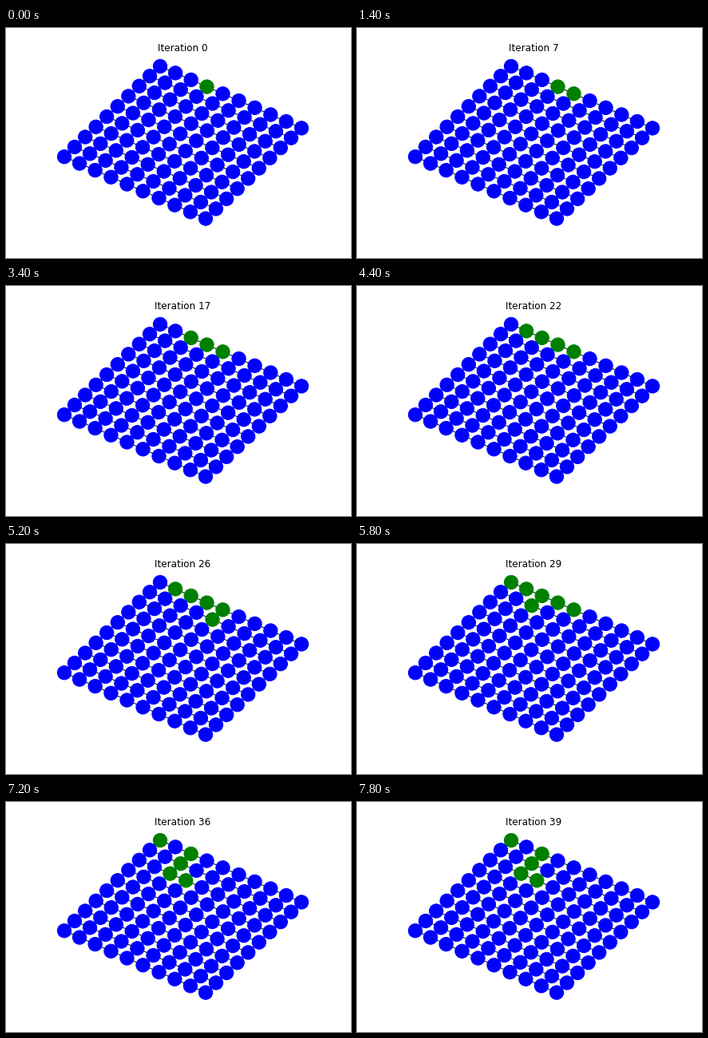
Write a matplotlib script that moves like this. It is 432 px wide and 288 px high and loops after 8000 ms.

```python
import numpy as np
import matplotlib.pyplot as plt
from matplotlib.animation import FuncAnimation
from matplotlib.collections import LineCollection

W, H, DPI = 432, 288, 72
SIDE = 10
FRAMES, STEP_MS = 40, 200

# (column, row, first iteration, end iteration) of each active spell
SPELLS = [
    (3, 0, 0, 10), (3, 0, 15, 35),
    (4, 0, 4, 34),
    (2, 0, 16, FRAMES),
    (1, 0, 21, 36),
    (4, 1, 23, 29),
    (2, 1, 28, FRAMES),
    (0, 0, 29, FRAMES),
    (2, 2, 30, FRAMES),
    (3, 2, 36, FRAMES),
]


def lattice():
    """Relaxed square lattice: steps shrink slightly towards the rim."""
    t = np.linspace(-1, 1, SIDE)
    s = t * (1 + 0.02 * (1 - t ** 2))
    col, row = np.meshgrid(s, s)
    x = 221.5 + 88.5 * col - 60.0 * row
    y = 143.3 + 38.7 * col + 56.6 * row
    return np.stack([x, y], axis=-1)


def links(pos):
    across = np.stack([pos[:, :-1], pos[:, 1:]], axis=2).reshape(-1, 2, 2)
    down = np.stack([pos[:-1], pos[1:]], axis=2).reshape(-1, 2, 2)
    return np.concatenate([across, down])


def node_colors(n):
    colors = ["blue"] * SIDE ** 2
    for col, row, start, end in SPELLS:
        if start <= n < end:
            colors[row * SIDE + col] = "green"
    return colors


fig, ax = plt.subplots(figsize=(W / DPI, H / DPI), dpi=DPI)
fig.subplots_adjust(left=0.125, right=0.9, bottom=0.11, top=0.88)
ax.set_xlim(0.125 * W, 0.9 * W)
ax.set_ylim(0.89 * H, 0.12 * H)
ax.axis("off")

pos = lattice()
ax.add_collection(LineCollection(links(pos), colors="black", linewidths=1, zorder=1))
nodes = ax.scatter(*pos.reshape(-1, 2).T, s=300, c=node_colors(0),
                   linewidths=1, zorder=2)
title = ax.set_title("Iteration 0", fontsize=12)


def draw(n):
    nodes.set_color(node_colors(n))
    title.set_text(f"Iteration {n}")
    return nodes, title


anim = FuncAnimation(fig, draw, frames=FRAMES, init_func=lambda: draw(0),
                     interval=STEP_MS, repeat=True, repeat_delay=0, blit=False)
plt.show()
```
